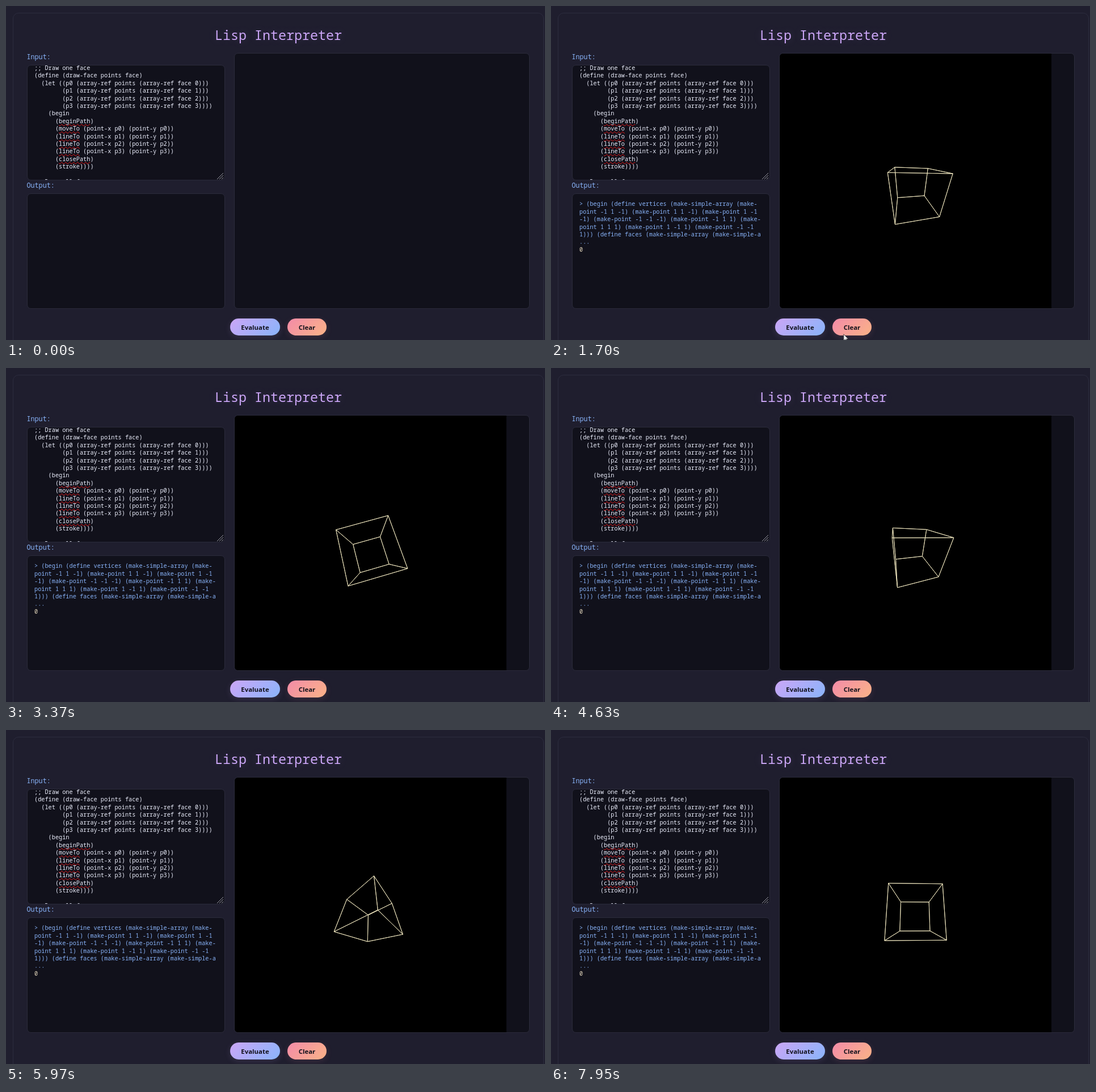
These frames come from a looping animation (950x590 px, 8 s). An HTML page with a canvas:

```html
<!DOCTYPE html>
<html lang="en">
<head>
<meta charset="utf-8">
<title>Lisp Interpreter</title>
<style>
  html, body { margin: 0; width: 100%; height: 100%; overflow: hidden; background: #1f1e2e; }
  #stage { position: relative; width: 950px; height: 590px; overflow: hidden; }
  #stage * { position: absolute; box-sizing: border-box; margin: 0; }
  #stage u { position: static; text-decoration: underline wavy #f01818 1.2px;
    text-underline-offset: 1px; text-decoration-skip-ink: none; }
  h1, label, pre { font-family: "Noto Sans Mono", monospace; font-weight: 500; white-space: pre; }
  h1 { left: 368px; top: 35px; font-size: 23.33px; color: #cba6f7; text-shadow: 0 0 16px #cba6f730; }
  label { left: 36.5px; font-size: 11.73px; color: #89b4fa; }
  pre { left: 12px; font-size: 10.26px; line-height: 13.42px; color: #eceffd; }
  .frame { left: 12px; top: 12px; width: 936px; height: 620px; border: 1px solid #2c2c3e; border-radius: 10px; }
  .box { background: #11111b; border: 1px solid #2b2b3b; border-radius: 7px; overflow: hidden; }
  button { top: 552px; height: 30px; padding: 0; border: 0; border-radius: 15px; color: #11111b;
    font: 700 11.4px "Open Sans", sans-serif; }
  #answer { color: #89b4fa; }
  #answer b { position: static; font-weight: 500; color: #e8dcc0; }
  #ring { left: 415px; top: 555px; width: 20px; height: 20px; border-radius: 50%; background: #e6dc3ca6; }
</style>
</head>
<body>
<div id="stage">
  <div class="frame"></div>
  <h1>Lisp Interpreter</h1>
  <label style="top:81px">Input:</label>
  <label style="top:307.5px">Output:</label>

  <div class="box" style="left:37px;top:104px;width:349px;height:204px">
    <pre style="top:-2.2px">;; Draw one face
(define (draw-face points face)
  (let ((p0 (array-ref points (array-ref face 0)))
        (p1 (array-ref points (array-ref face 1)))
        (p2 (array-ref points (array-ref face 2)))
        (p3 (array-ref points (array-ref face 3))))
    (begin
      (<u>beginPath</u>)
      (<u>moveTo</u> (point-x p0) (point-y p0))
      (<u>lineTo</u> (point-x p1) (point-y p1))
      (<u>lineTo</u> (point-x p2) (point-y p2))
      (<u>lineTo</u> (point-x p3) (point-y p3))
      (<u>closePath</u>)
      (stroke))))

;; Draw all faces</pre>
    <svg style="right:0;bottom:0" width="14" height="13"><path d="M1 12L12 1M5 12L12 5M9 12L12 9" stroke="#9a9aa4"/></svg>
  </div>

  <div class="box" style="left:37px;top:331px;width:349px;height:204px">
    <pre id="answer" style="top:11.3px">&gt; (begin (define vertices (make-simple-array (make-
point -1 1 -1) (make-point 1 1 -1) (make-point 1 -1
-1) (make-point -1 -1 -1) (make-point -1 1 1) (make-
point 1 1 1) (make-point 1 -1 1) (make-point -1 -1
1))) (define faces (make-simple-array (make-simple-a
...
<b>0</b></pre>
  </div>

  <div class="box" style="left:402px;top:83px;width:521px;height:452px">
    <canvas id="view" width="480" height="480" style="left:-1px;top:-1px"></canvas>
  </div>

  <button style="left:395px;width:88px;background:linear-gradient(135deg,#cba6f7,#89b4fa);box-shadow:0 3px 12px #cba6f722">Evaluate</button>
  <button style="left:496px;width:69px;background:linear-gradient(135deg,#f38ba8,#fab387);box-shadow:0 3px 12px #f38ba822">Clear</button>

  <div id="ring"></div>
  <svg id="arrow" style="left:0;top:0" width="12" height="18"><path d="M.7 .7V12.2L3.4 9.8L5.3 14L7.2 13.2L5.3 9.1H8.8Z" fill="#eee" stroke="#222" stroke-width=".7"/></svg>
  <svg id="hand" style="left:-4px;top:0" width="16" height="20"><path d="M3.5 10V2Q5 0 6.2 2V7Q8 5.6 8.8 7.4Q10.6 6.2 11.3 8Q13.4 7.2 13.6 9.5V13Q13 15 12 17.5H6Q4.5 15 1.2 11.5Q1.5 9 3.5 10Z" fill="#fff" stroke="#111"/><path d="M6.2 7v4M8.8 7.5v3.5M11.3 8v3" stroke="#111"/></svg>
</div>

<script>
const LOOP = 8000, CLICK = 1180, STEP = 66.4;
const DEG = Math.PI / 180;
const $ = id => document.getElementById(id);
const ctx = $('view').getContext('2d');

const vertices = [[-1, 1, -1], [1, 1, -1], [1, -1, -1], [-1, -1, -1],
                  [-1, 1, 1], [1, 1, 1], [1, -1, 1], [-1, -1, 1]];
const faces = [[0, 1, 2, 3], [1, 5, 6, 2], [5, 4, 7, 6],
               [4, 0, 3, 7], [0, 4, 5, 1], [3, 2, 6, 7]];

// Pointer path: time, x, y
const pointerPath = [[620, 480, 592], [780, 440, 578], [1040, 424, 565], [1500, 424, 565],
                     [1800, 560, 586], [2300, 735, 583], [2370, 772, 575], [2560, 820, 592]];

// Turn around x, then y, then z by the same angle, then project.
function project([x, y, z], angle) {
  const c = Math.cos(angle), s = Math.sin(angle);
  [y, z] = [y * c - z * s, y * s + z * c];
  [z, x] = [z * c - x * s, z * s + x * c];
  [x, y] = [x * c - y * s, x * s + y * c];
  const scale = 102.4 / (3 + z);
  return [240 + x * scale, 242 + y * scale];
}

function drawCube(angle) {
  const points = vertices.map(v => project(v, angle));
  ctx.fillStyle = '#000';
  ctx.fillRect(0, 0, 480, 480);
  ctx.strokeStyle = '#ece4bd';
  ctx.lineWidth = 0.9;
  for (const face of faces) {
    ctx.beginPath();
    for (const i of face) ctx.lineTo(...points[i]);
    ctx.closePath();
    ctx.stroke();
  }
}

function show(id, on) {
  $(id).style.visibility = on ? 'visible' : 'hidden';
}

function movePointer(t) {
  const i = pointerPath.findIndex(p => p[0] > t);
  const visible = i > 0;
  let overButton = false;
  if (visible) {
    const [t0, x0, y0] = pointerPath[i - 1], [t1, x1, y1] = pointerPath[i];
    const k = (t - t0) / (t1 - t0);
    const x = x0 + (x1 - x0) * k, y = y0 + (y1 - y0) * k;
    overButton = x > 395 && x < 483 && y < 582;
    $('arrow').style.transform = $('hand').style.transform = `translate(${x}px,${y}px)`;
  }
  show('arrow', visible && !overButton);
  show('hand', overButton);
}

function render(now) {
  const t = now % LOOP;
  const frame = Math.floor((t - CLICK) / STEP + 0.2);
  const running = frame > 0;
  show('view', running);
  show('answer', running);
  // The cube turns two degrees per tick, about four ticks per shown frame.
  const ticks = Math.round(4.026 * frame - 1.37);
  if (running) drawCube(2 * ticks * DEG);
  movePointer(t);
  show('ring', t >= CLICK - 10 && t < 1400);
}

const start = performance.now();
function tick() {
  render(performance.now() - start);
  requestAnimationFrame(tick);
}
tick();
</script>
</body>
</html>
```
